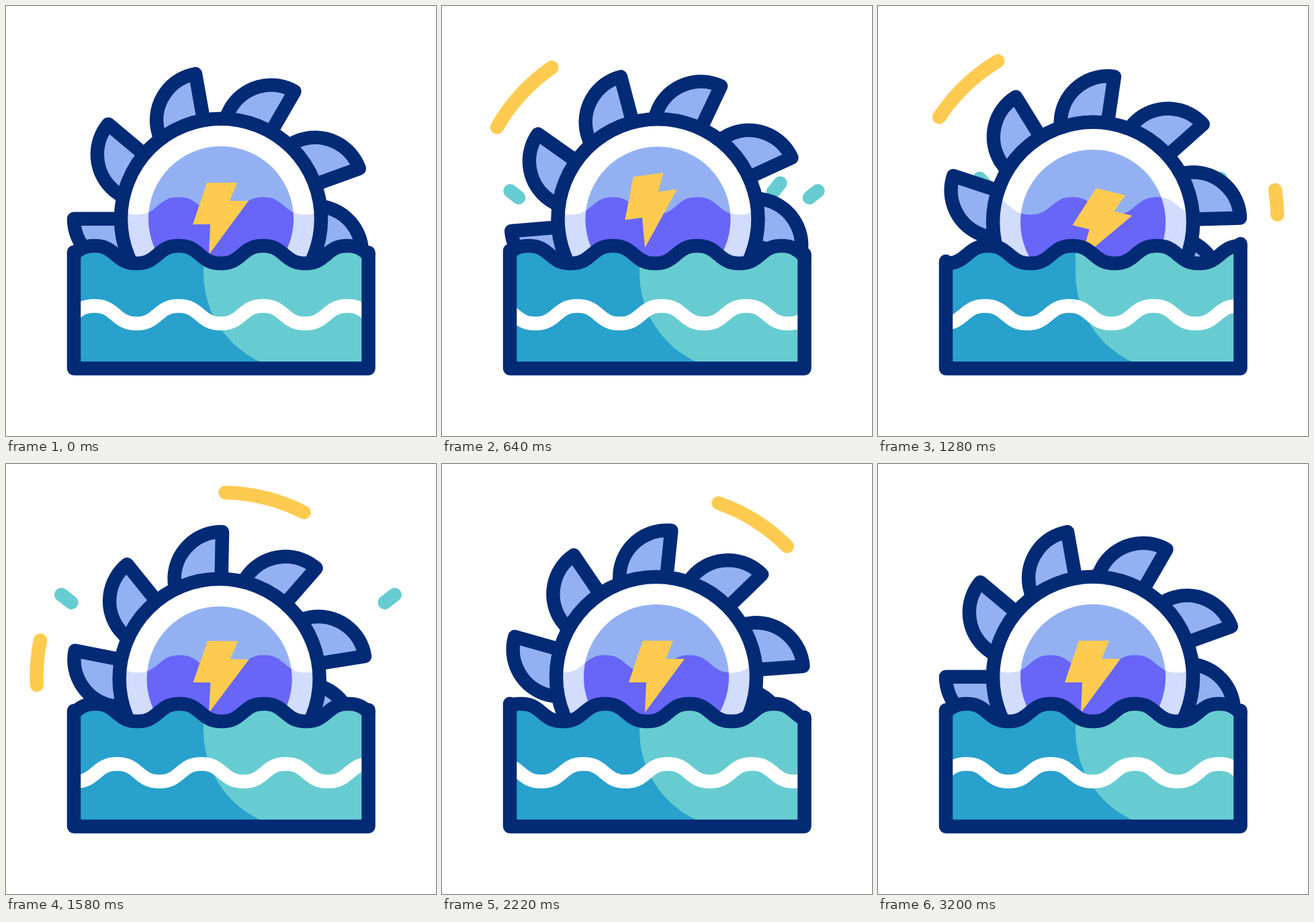
Write an HTML page with a canvas that moves like this. It is 640 by 640 pixels and loops after 3600 ms.

```html
<!DOCTYPE html>
<html lang="en">
<head>
<meta charset="utf-8">
<title>Tidal power</title>
<style>
  html, body { margin: 0; width: 100%; height: 100%; overflow: hidden; background: #fff; }
  canvas { display: block; }
</style>
</head>
<body>
<canvas id="stage" width="640" height="640"></canvas>
<script>
const ctx = document.getElementById('stage').getContext('2d');
const NAVY = '#032a75', PALE = '#93b1f2', VIOLET = '#6865f9', LAVENDER = '#d2dcfd';
const YELLOW = '#fecb50', BLUE = '#28a1cd', TEAL = '#67ccd1';
const RAD = Math.PI / 180, LOOP = 3600, STEP = 320, PERIOD = 125.5;
const LEFT = 101, RIGHT = 539.5, BOTTOM = 539.5;

// Key values, one every STEP ms
const TURN = [0, 7.4, 35.2, 93.7, 178.1, 255, 305.9, 337.3, 353.4, 359.6, 360];
const SURFACE = [0, .25, .976, 2.013, 3.255, 4.05, 4.58, 4.9, 5.05, 5.03, 5];
const STRIPE = [0, -.1, -.44, -.944, -1.777, -2.79, -3.785, -4.4, -4.77, -4.95, -5];
const TILT = [0, 0, -7.6, -29.4, 13.7, 0, 0];
const LIFT = [0, -3, -10, -12, 5.7, 0, 0];
const BOLT = [[-3, -107], [42, -107], [31, -80], [59, -80], [0, 0], [2, -45], [-24, -45]];

// Smooth curve through evenly spaced keys
function track(keys, t) {
  const last = keys.length - 1;
  const p = Math.min(t / STEP, last), i = Math.min(Math.floor(p), last - 1), f = p - i;
  const a = keys[i], b = keys[i + 1];
  const slopeA = i > 0 ? (b - keys[i - 1]) / 2 : 0;
  const slopeB = i + 2 <= last ? (keys[i + 2] - a) / 2 : 0;
  const g = 1 - f;
  return a * (1 + 2 * f) * g * g + b * f * f * (3 - 2 * f) + slopeA * f * g * g - slopeB * f * f * g;
}

function waveY(x, mid, shift) {
  const a = ((x - 131.5) / PERIOD - shift) * 2 * Math.PI;
  return mid - 13 * (1.07 * Math.cos(a) - .07 * Math.cos(3 * a));
}

function wavePath(mid, shift) {
  ctx.beginPath();
  for (let x = LEFT; x <= RIGHT; x += 1.5) ctx.lineTo(x, waveY(x, mid, shift));
  ctx.lineTo(RIGHT, waveY(RIGHT, mid, shift));
}

function fillBelow(mid, shift, color) {
  wavePath(mid, shift);
  ctx.lineTo(RIGHT, BOTTOM);
  ctx.lineTo(LEFT, BOTTOM);
  fill(color);
}

function fill(color) { ctx.fillStyle = color; ctx.fill(); }
function stroke(color) { ctx.strokeStyle = color; ctx.stroke(); }
function disc(x, y, r) { ctx.beginPath(); ctx.arc(x, y, r, 0, 2 * Math.PI); }

// Light streak running over the top, short at both ends of its way
function streak(t, start) {
  const head = -10.7 + (t - start) * .1928;
  const len = Math.min(25.4, (head + 10.7) * .63, (191 - head) * .62);
  if (len <= 0) return;
  ctx.beginPath();
  ctx.arc(320, 317, 274.5, (180 + head - len) * RAD, (180 + head) * RAD);
  stroke(YELLOW);
}

// Drop flying out along a quadratic curve, mirrored on the other side
function drop(t, start, [x0, y0, x1, y1, x2, y2]) {
  const head = (t - start) * .0017, tail = head - .1;
  if (head < 0 || tail > 1) return;
  for (const side of [-1, 1]) {
    ctx.beginPath();
    for (const v of [tail, (tail + head) / 2, head]) {
      const u = Math.max(0, Math.min(1, v)), w = 1 - u;
      const x = w * w * x0 + 2 * u * w * x1 + u * u * x2;
      ctx.lineTo(330.5 + side * (330.5 - x), w * w * y0 + 2 * u * w * y1 + u * u * y2);
    }
    stroke(TEAL);
  }
}

function drawWheel(t, shift) {
  const turn = track(TURN, t) * RAD;
  const cx = 320 + 2.5 * Math.sin(turn), cy = 319.2 - 2.5 * Math.cos(turn);
  for (let i = 0; i < 9; i++) {
    ctx.save();
    ctx.translate(cx, cy);
    ctx.rotate(turn + i * 40 * RAD);
    ctx.beginPath();
    ctx.moveTo(-149, 0);
    ctx.arc(-149, 0, 70, Math.PI, Math.PI / 3, true);
    ctx.closePath();
    fill(PALE);
    stroke(NAVY);
    ctx.restore();
  }
  for (const [r, upper, lower] of [[149, '#fff', LAVENDER], [108, PALE, VIOLET]]) {
    ctx.save();
    disc(cx, cy, r);
    fill(upper);
    ctx.clip();
    fillBelow(297.5, shift, lower);
    ctx.restore();
  }
  disc(cx, cy, 149);
  stroke(NAVY);
}

function drawBolt(t) {
  ctx.save();
  ctx.translate(302, 370 + track(LIFT, t));
  ctx.rotate(track(TILT, t) * RAD);
  ctx.beginPath();
  for (const [x, y] of BOLT) ctx.lineTo(x, y);
  fill(YELLOW);
  ctx.restore();
}

function drawWater(t, shift) {
  ctx.save();
  fillBelow(370, shift, BLUE);
  wavePath(370, shift);
  ctx.lineTo(RIGHT, BOTTOM);
  ctx.lineTo(LEFT, BOTTOM);
  ctx.clip();
  ctx.beginPath();
  ctx.moveTo(294, 340);
  ctx.arc(439, 398, 145, Math.PI, Math.PI / 2, true);
  ctx.lineTo(RIGHT, 543);
  ctx.lineTo(RIGHT, 340);
  fill(TEAL);
  wavePath(459.5, track(STRIPE, t));
  stroke('#fff');
  ctx.restore();

  wavePath(370, shift);
  stroke(NAVY);
  ctx.beginPath();
  ctx.moveTo(LEFT, waveY(LEFT, 370, shift) - 3);
  ctx.lineTo(LEFT, BOTTOM);
  ctx.lineTo(RIGHT, BOTTOM);
  ctx.lineTo(RIGHT, waveY(RIGHT, 370, shift) - 3);
  stroke(NAVY);
}

function draw(t) {
  const shift = track(SURFACE, t);
  ctx.fillStyle = '#fff';
  ctx.fillRect(0, 0, 640, 640);
  ctx.lineWidth = 20.5;
  ctx.lineCap = ctx.lineJoin = 'round';
  for (const start of [299, 920, 1466]) streak(t, start);
  drop(t, 228, [175, 345, 135, 295, 60, 246]);
  for (const start of [525, 1133]) drop(t, start, [178, 290, 130, 222, 43, 168]);
  drawWheel(t, shift);
  drawBolt(t);
  drawWater(t, shift);
}

const began = performance.now();
function frame() {
  draw((performance.now() - began) % LOOP);
  requestAnimationFrame(frame);
}
frame();
</script>
</body>
</html>
```
